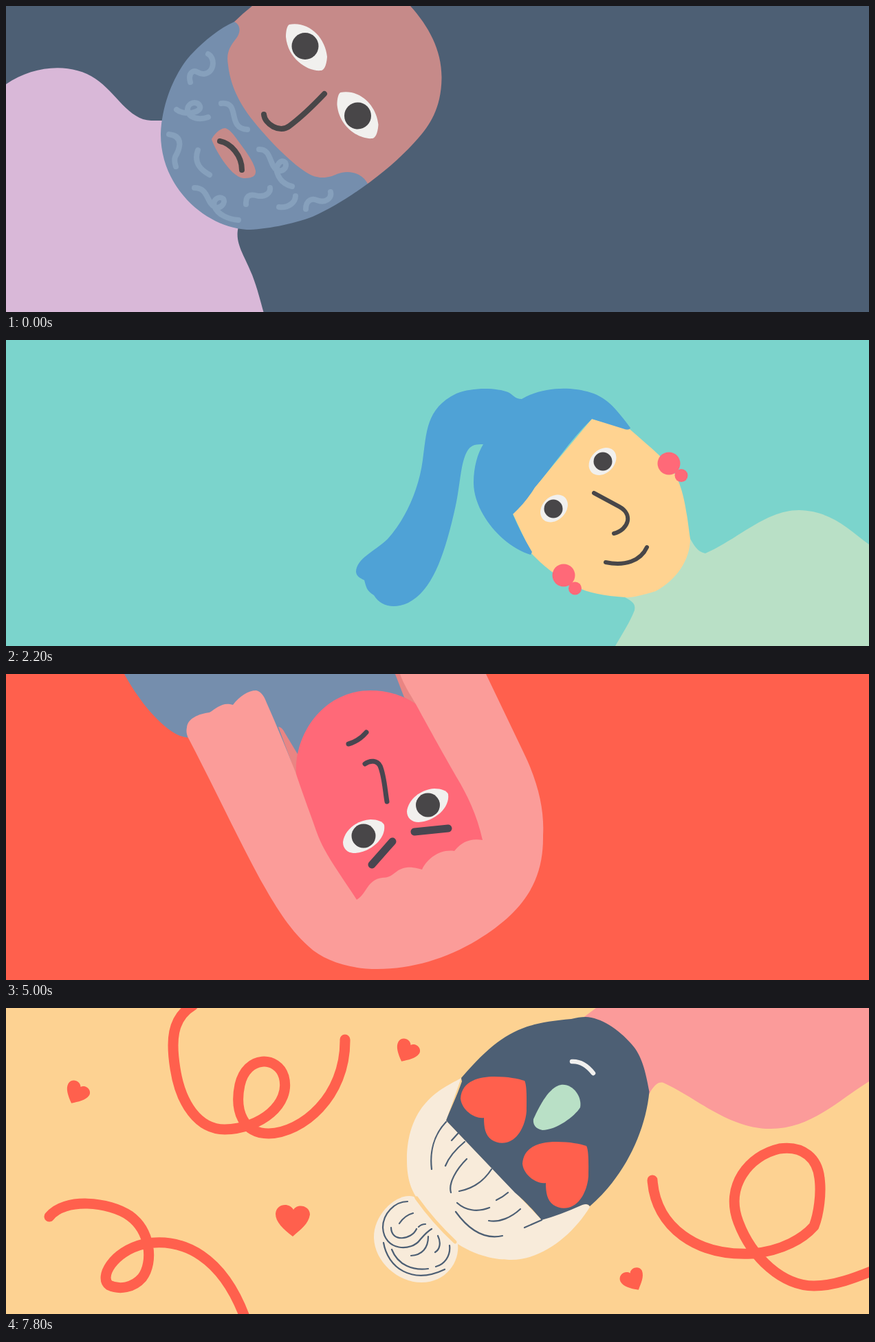
An HTML page for the animation above (8 s loop, 1255 by 446 pixels).

```html
<!DOCTYPE html>
<html lang="en">
<head>
<meta charset="utf-8">
<title>Four moods</title>
<style>
html, body { margin: 0; height: 100%; overflow: hidden; }
svg { display: block; width: 100vw; height: 100vh; }
.line { fill: none; stroke: #484648; stroke-linecap: round; stroke-linejoin: round; }
.white { fill: #f1f0ee; }
.dark { fill: #484648; }
</style>
</head>
<body>
<svg viewBox="0 0 1255 446" preserveAspectRatio="none">
<defs>
  <path id="eyeA" class="white" d="M412 27C440 22 464 45 467 74C466 88 462 94 458 94C440 96 410 78 407 45C407 36 409 28 412 27Z"/>
  <path id="eyeB" class="white" d="M490 245C492 228 510 213 530 212C540 212 548 215 550 220C553 240 530 260 507 261C497 261 490 255 490 245Z"/>
  <path id="eyeC" class="white" d="M682 115C685 110 692 110 701 112C728 117 748 142 749 165C749 176 746 181 740 181C705 182 680 148 682 115Z"/>
  <path id="heartEye" d="M661 132C663 105 690 100 710 100C730 100 745 103 754 106C758 112 757 140 757 150C756 165 750 178 745 184C735 198 718 200 706 192C697 185 695 175 695 160C683 162 663 150 661 132Z"/>
  <path id="heart" d="M0 24C-14 13-25 3-25-9C-24-24-5-26 1-15C7-25 25-21 25-8C23 6 11 14 0 24Z"/>
  <path id="drop" d="M19 0C23 30 39 52 39 76C39 90 30 97 19.500 97C9 97 0 90 0 76C0 52 16 30 19 0Z"/>
</defs>

<!-- sad: bearded man -->
<g data-on="0 2200">
  <rect width="1255" height="446" fill="#4d5f74"/>
  <path fill="#d9b8d8" d="M0 114C40 86 95 82 130 106C160 126 178 166 211 167H230L338 322C332 345 346 362 358 392C366 413 370 430 374.500 446H0Z"/>
  <path fill="#c68a89" d="M332 23Q344 11 358 0H588C615 30 634 65 633.500 105C633 150 615 175 600 192C580 215 555 238 526 259L360 280L270 150Z"/>
  <path fill="#758ead" d="M332 23C341 27 342 38 335 47C325 60 320 68 323 86C326 112 336 138 360 168C390 205 425 238 445 247C460 253 473 249 481 245C500 238 518 244 526 259C500 278 475 294 446 307C418 318 375 326 350 326C290 322 225 265 225 187C227 130 255 85 270 70C290 49 310 33 332 23Z"/>
  <path class="line" style="stroke:#86a0bc" stroke-width="8" d="M294 70C304 75 304 97 288 99C279 100 277 92 271 96C265 100 267 107 268 111
    M248 151C258 160 285 156 282 146C278 137 264 141 264 151C265 165 283 166 294 162
    M313 142C342 139 320 178 351 180
    M237 187C262 190 250 213 246 220C244 226 246 230 247 234
    M279 210C272 230 285 240 296 246
    M368 209C386 208 383 233 394 239C402 243 410 235 406 228C400 222 392 232 394 242C398 256 408 261 416 263
    M274 265C295 265 291 287 304 293C312 296 320 287 316 281C310 276 300 282 303 292C308 305 325 311 338 312
    M349 289C348 272 360 275 367 277C378 278 385 272 384 265
    M397 293C412 295 421 285 421 277
    M436 296C436 282 446 280 452 283C465 288 474 280 472 271"/>
  <path fill="#c68a89" d="M299 194C306 182 314 178 319 178C325 180 330 186 335 193C345 207 360 225 363 240C364 250 354 251 345 251C325 248 302 205 299 194Z"/>
  <path class="line" stroke-width="8" d="M311 197C327 200 343 218 343 239M463 128C445 147 428 163 412 175C398 186 376 172 375 158"/>
  <use href="#eyeA"/><use href="#eyeA" x="74.500" y="99"/>
  <circle class="dark" cx="435" cy="58.500" r="19.500"/><circle class="dark" cx="511.500" cy="160" r="19.500"/>
  <g fill="#7bd4cc">
    <g data-on="500 1100 1300 2200"><use href="#drop" x="409" y="172"/><use href="#drop" x="515" y="172"/></g>
    <use data-on="700 1100 1500 2200" href="#drop" x="515" y="275"/>
    <path data-on="900 1100 1700 2200" d="M506 398C508 372 575 382 640 364C740 336 850 346 930 356C1030 366 1174 362 1177 396C1178 430 1010 436 850 436C690 436 504 430 506 398Z"/>
  </g>
</g>

<!-- surprised: girl with ponytail -->
<g data-on="2200 5000">
  <rect width="1255" height="446" fill="#7bd4cc"/>
  <path fill="#b9e0c6" d="M1255 298C1225 276 1200 249 1153 248C1105 248 1065 290 1017 311C1005 309 1000 298 994 288L900 375C915 383 915 387 914 394C907 412 895 430 886 446H1255Z"/>
  <path fill="#ffd391" d="M852 115L907 130C925 146 940 158 955 173C985 200 988 240 995 290C995 320 975 350 945 366C925 372 910 376 900 375C870 373 845 368 830 360C800 345 780 328 764 311L737 253Z"/>
  <path fill="#4fa2d6" d="M750 86C780 68 820 68 845 75C872 82 885 97 908 128C907 131 903 131 900 130L852 115C820 146 795 185 769 215C760 230 750 242 737 254Q749 282 765 309L763 313C720 300 680 250 680 208C680 185 686 165 694 152C684 152 678 152 672 160C660 178 661 215 652 250C637 315 620 365 585 383C565 392 545 389 535 372C525 366 524 361 521 350C515 347 510 345 509 338C510 318 535 309 555 290C580 262 600 220 606 175C612 135 610 100 655 78C680 68 715 70 730 76C738 80 740 86 750 86Z"/>
  <ellipse class="white" rx="22.500" ry="17" transform="translate(867.500 177)rotate(-45)"/>
  <ellipse class="white" rx="22.500" ry="17" transform="translate(797 245.500)rotate(-45)"/>
  <circle class="dark" cx="868" cy="177" r="13.500"/><circle class="dark" cx="796" cy="246" r="13.500"/>
  <path class="line" stroke-width="6" d="M855 223L892 243C912 254 906 276 884 282M872 324C900 330 923 322 932 302"/>
  <g fill="#ff6978">
    <circle cx="964" cy="180" r="16.500"/><circle cx="982" cy="197.500" r="9.500"/>
    <circle cx="811" cy="343" r="16.500"/><circle cx="827.500" cy="362" r="9.500"/>
  </g>
  <g class="line" stroke-width="11.500">
    <path data-on="2700 2900 3100 3300 3500 3700 3900 4100 4300 4500" d="M452 24Q502 62 546 104M730-5L736 37M1020 3L961 89M335 415Q400 387 465 365"/>
    <path data-on="2700 3100 3300 3700 3900 4100 4300 4500" d="M362 198L480 211M1135 155Q1085 178 1033 210"/>
    <path data-on="2700 3100 3500 3700 3900 4100 4300 4500" d="M675 450L708 405"/>
  </g>
</g>

<!-- angry: upside-down man with raised arm -->
<g data-on="5000 6700">
  <rect width="1255" height="446" fill="#ff604d"/>
  <path fill="#758ead" d="M172 0C192 36 215 65 240 83C250 90 258 92 266 93L420 130L590 50L566 0Z"/>
  <path fill="#e98583" d="M396 77C400 77 403 81 405 85L426 120L423 150ZM566 0L579 34L600 47L575 0Z"/>
  <path fill="#ff6978" d="M422 146C418 90 460 24 530 24C555 24 578 31 598 45L660 130L700 250L510 335L440 220Z"/>
  <path fill="#fb9c99" d="M263 78C264 65 280 58 296 56C306 50 315 40 330 45C340 32 352 24 364 24C372 26 376 34 379 42C395 78 410 115 421 143C435 185 445 210 452 231C463 262 485 290 510 329C525 320 525 300 547 297C565 297 565 284 583 282C592 281 600 284 605 285C612 270 630 255 652 258C662 245 675 239 693 242C685 205 670 175 655 150C635 115 610 70 596 44C588 30 578 15 573 0H698L752 113C775 160 783 200 781 235C782 300 755 345 685 388C640 415 590 430 540 430C500 430 462 418 440 397C410 370 390 335 370 300C340 245 300 160 266 95C262 88 262 82 263 78Z"/>
  <use href="#eyeB"/><use href="#eyeB" x="93" y="-45"/>
  <circle class="dark" cx="520" cy="236" r="17.500"/><circle class="dark" cx="613.500" cy="191" r="17.500"/>
  <g class="line" style="stroke:#484650">
    <path stroke-width="7" d="M498 102Q513 98 524 85M522 131C530 125 540 126 544 134C550 148 551 168 554 186"/>
    <path stroke-width="11" d="M532 278L562 244M594 230L643 225"/>
    <path data-on="5500 6700" data-draw="5500 8" stroke-width="12" d="M685 417C730 400 800 350 790 300C780 260 735 300 770 335C830 380 930 300 890 245C850 200 800 260 850 290C930 330 1015 250 960 185C900 130 850 190 905 215C980 240 1021 170 1021 49"/>
  </g>
</g>

<!-- in love: woman with a bun -->
<g data-on="6700 8000">
  <rect width="1255" height="446" fill="#fdd292"/>
  <path fill="#fb9b9a" d="M858 0L838 15L935 126C942 113 948 107 956 109C1000 128 1050 176 1112 176C1170 176 1210 135 1255 107V0Z"/>
  <path fill="#f8ebda" d="M662 102C640 115 583 135 583 222C583 250 590 266 597 276C610 292 640 328 657 344C690 365 720 367 735 367C780 367 825 330 849 290C846 285 842 285 838 287L779 309L640 164Z"/>
  <path fill="#f8ebda" d="M593 275C570 268 534 300 535 335C536 370 570 400 604 400C640 400 660 370 657 344Z"/>
  <path class="line" style="stroke:#fdd292" stroke-width="5" d="M597 277Q622 312 653 341"/>
  <path fill="#4d5f74" d="M662 102C720 35 750 22 822 16C830 14 836 13 843 13C865 14 890 30 910 53C925 70 930 92 935.500 122C930 180 900 245 849 289Q846 284 838 287Q805 302 779 309C765 293 755 282 740 269L640 164C645 150 655 130 663 107Z"/>
  <path class="line" style="stroke:#4d5f74" stroke-width="2.200" d="M640 166C622 185 616 210 619 235M658 182L648 193M667 195C655 205 645 215 639 230
    M670 220C655 235 643 255 647 269M706 235C695 252 680 263 659 267M730 269Q722 276 713 280M656 284C668 295 685 298 703 291
    M748 293C735 305 718 313 702 310M654 297C672 322 695 338 722 332M779 309L754 320
    M584 282C565 282 548 300 548 320C550 355 590 355 602 338C608 331 612 326 619 322M592 299Q580 302 572 314
    M560 320C560 342 590 338 597 322M600 319Q604 315 610 315M614 333C614 350 605 360 589 361M628 332C633 342 631 352 624 356
    M645 346C647 362 637 374 625 377M561 352C570 375 592 383 614 380M549 342C555 378 590 404 638 381"/>
  <use href="#eyeC"/><use href="#eyeC" x="86" y="91"/>
  <circle cx="714.500" cy="145.500" r="19.500" fill="#211d1c"/><circle cx="802" cy="238" r="19.500" fill="#211d1c"/>
  <path fill="#b9e0c6" d="M807 112C825 110 838 130 835 145C827 158 800 178 780 178C770 176 766 170 767 162C776 142 790 115 807 112Z"/>
  <path class="line" style="stroke:#f1f0ee" stroke-width="6.500" d="M823 78Q840 77 854 95"/>
  <g class="line" style="stroke:#ff604d" stroke-width="15" data-on="7200 8000">
    <path data-draw="7200 5" d="M272-4C240 15 240 50 246 88C254 140 280 177 318 177C370 176 415 140 404 100C395 70 350 68 340 112C332 150 345 183 382 183C430 182 494 130 493 46"/>
    <path data-draw="7200 5" d="M63 304C85 276 150 282 180 303C210 325 215 370 198 393C185 408 165 411 150 404C135 393 155 355 200 344C260 333 315 365 347 450"/>
    <path data-draw="7200 5" d="M940 251C945 320 1005 362 1085 358C1130 354 1160 335 1175 318C1182 300 1186 270 1183 248C1180 220 1160 200 1125 205C1080 215 1045 260 1065 312C1085 365 1130 405 1175 405C1205 405 1235 393 1260 383"/>
  </g>
  <g fill="#ff604d" data-on="7800 8000">
    <use href="#heartEye"/><use href="#heartEye" x="90" y="95"/>
    <use href="#heart" transform="translate(417 309)"/>
    <use href="#heart" transform="translate(103 124)rotate(28)scale(.7)"/>
    <use href="#heart" transform="translate(583 63)rotate(28)scale(.7)"/>
    <use href="#heart" transform="translate(912 396)rotate(-28)scale(.7)"/>
  </g>
</g>
</svg>
<script>
const LOOP = 8000, STEP = 100;
const nums = s => s.split(' ').map(Number);

// data-on: pairs of start and end times
const timed = [...document.querySelectorAll('[data-on]')].map(el => ({ el, edges: nums(el.dataset.on) }));

// data-draw: start time and number of steps until the stroke is complete
const strokes = [...document.querySelectorAll('[data-draw]')].map(el => {
  const [start, steps] = nums(el.dataset.draw);
  return { el, start, steps, length: el.getTotalLength() };
});

function render(t) {
  for (const { el, edges } of timed) {
    const passed = edges.filter(e => t >= e).length;
    el.style.display = passed % 2 ? '' : 'none';
  }
  for (const { el, start, steps, length } of strokes) {
    const done = Math.floor((t - start) / STEP) + 1;
    const part = Math.max(0, Math.min(1, done / steps));
    el.style.strokeDasharray = part < 1 ? `${length * part} ${length * 2}` : 'none';
  }
}

const begin = performance.now();
function tick() {
  render((performance.now() - begin) % LOOP);
  requestAnimationFrame(tick);
}
tick();
</script>
</body>
</html>
```
